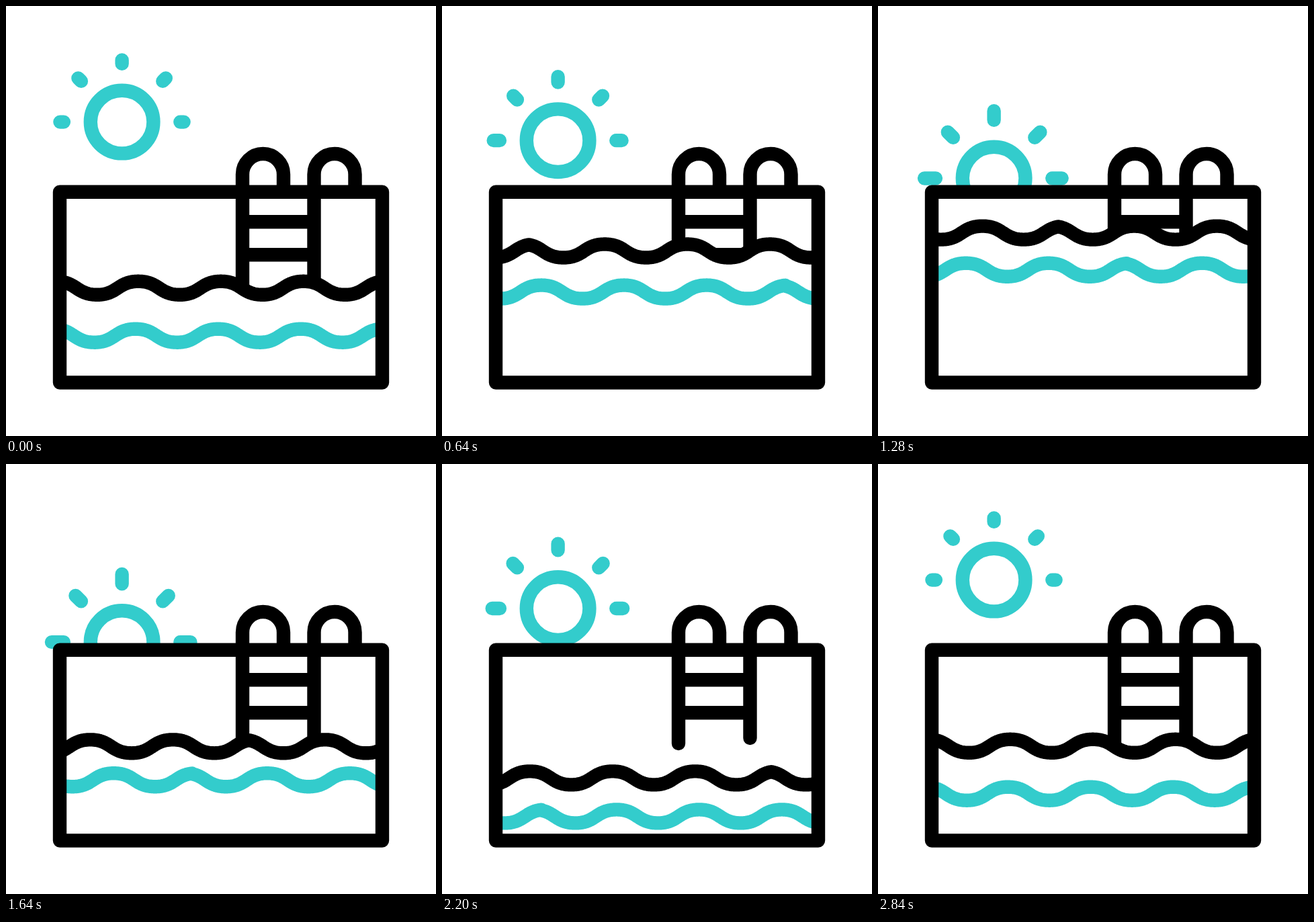
Write an HTML page that moves like this. It is 640 by 640 pixels and loops after 3000 ms.

```html
<!DOCTYPE html>
<html lang="en">
<head>
<meta charset="utf-8">
<title>Pool</title>
<style>
  html, body { margin: 0; width: 100%; height: 100%; overflow: hidden; background: #fff; }
  svg { display: block; width: 100vw; height: 100vh; }
  path, circle, rect { fill: none; stroke: #000; stroke-width: 20.4; stroke-linejoin: round; }
  .teal { stroke: #3cc; }
  .round { stroke-linecap: round; }
  .white { fill: #fff; stroke: none; }
</style>
</head>
<body>
<svg viewBox="0 0 640 640">
  <g id="sun">
    <circle class="teal" r="46.8"/>
    <path id="rays" class="teal round"/>
  </g>
  <rect class="white" x="80" y="276.8" width="480" height="283.7"/>
  <path class="round" d="M352 416V250.5a30.5 30.5 0 0 1 61 0V270M458.5 408V250.5a30.5 30.5 0 0 1 61 0V270"/>
  <path d="M352 321.3H458.5M352 370.2H458.5"/>
  <path id="water" class="white"/>
  <path id="front"/>
  <path id="back" class="teal"/>
  <rect x="80" y="276.8" width="480" height="283.7"/>
</svg>
<script>
const LOOP = 3000, STEP = 40, START = 120, END = 2840;
const HALF = 61.5; // half a wavelength
const $ = id => document.getElementById(id);
const sun = $('sun'), rays = $('rays'), water = $('water'), front = $('front'), back = $('back');

const smooth = s => s * s * (3 - 2 * s);
const span = (t, a, b) => Math.min(1, Math.max(0, (t - a) / (b - a)));

// cubic-bezier(.292, 0, .515, 1)
function ease(p) {
  let lo = 0, hi = 1;
  for (let i = 0; i < 24; i++) {
    const s = (lo + hi) / 2, r = 1 - s;
    if (3 * r * r * s * 0.292 + 3 * r * s * s * 0.515 + s * s * s < p) lo = s;
    else hi = s;
  }
  return smooth(lo);
}

// keys: [time, value] pairs, each leg eased
function track(t, keys) {
  let v = keys[0][1];
  for (let i = 1; i < keys.length; i++) {
    const [a, from] = keys[i - 1], [b, to] = keys[i];
    if (t > a) v = from + (to - from) * ease(span(t, a, b));
  }
  return v;
}

// Height of the wave at a distance from a crest
function swell(d) {
  const m = ((d % (2 * HALF)) + 2 * HALF) % (2 * HALF);
  const u = (m > HALF ? 2 * HALF - m : m) / HALF;
  return 20 * smooth(0.5 + Math.sinh(Math.asinh(4 * (u - 0.5)) / 3)) - 10;
}

// Two strips of waves that meet at the seam
function wave(seam, mid, cutL, cutR) {
  const pts = [];
  for (let x = 82; x <= 558; x += 1.5) {
    const d = x < seam ? seam - x + cutL : x - seam + cutR;
    pts.push(x.toFixed(1) + ' ' + (mid + swell(d)).toFixed(2));
  }
  return 'M' + pts.join('L');
}

function ray(dx, dy, inner, outer) {
  return `M${dx * inner} ${dy * inner}L${dx * outer} ${dy * outer}`;
}

function draw(t) {
  const k = t < 1567 ? smooth(span(t, START, 1567)) : 1 - smooth(span(t, 1567, 2760));
  sun.setAttribute('transform', `translate(172.6 ${172.6 + 93.5 * k})`);
  rays.setAttribute('d',
    ray(0, -1, 86.7, 92.2 + 9 * k) +
    ray(-1, 0, 86.7, 92.2 + 12.6 * k) +
    ray(1, 0, 86.7, 92 + 10 * k) +
    ray(-1, -1, 60.7, 65.2 + 4 * k) +
    ray(1, -1, 60.7, 65.2 + 4 * k));

  const e = smooth(span(t, START, END));
  const y1 = track(t, [[START, 419.8], [1165, 329.3], [2085, 471.8], [END, 419.8]]);
  const y2 = track(t, [[START, 490.7], [1160, 384.7], [2130, 525.7], [END, 490.7]]);
  const line = wave(84 + 472 * e, y1, 10, 10);
  front.setAttribute('d', line);
  water.setAttribute('d', line + 'V555H82Z');
  back.setAttribute('d', wave(556.5 - 474 * e, y2, 5.5, 12));
}

const begin = performance.now();
function tick() {
  const t = (performance.now() - begin) % LOOP;
  draw(Math.floor(t / STEP) * STEP);
  requestAnimationFrame(tick);
}
tick();
</script>
</body>
</html>
```
